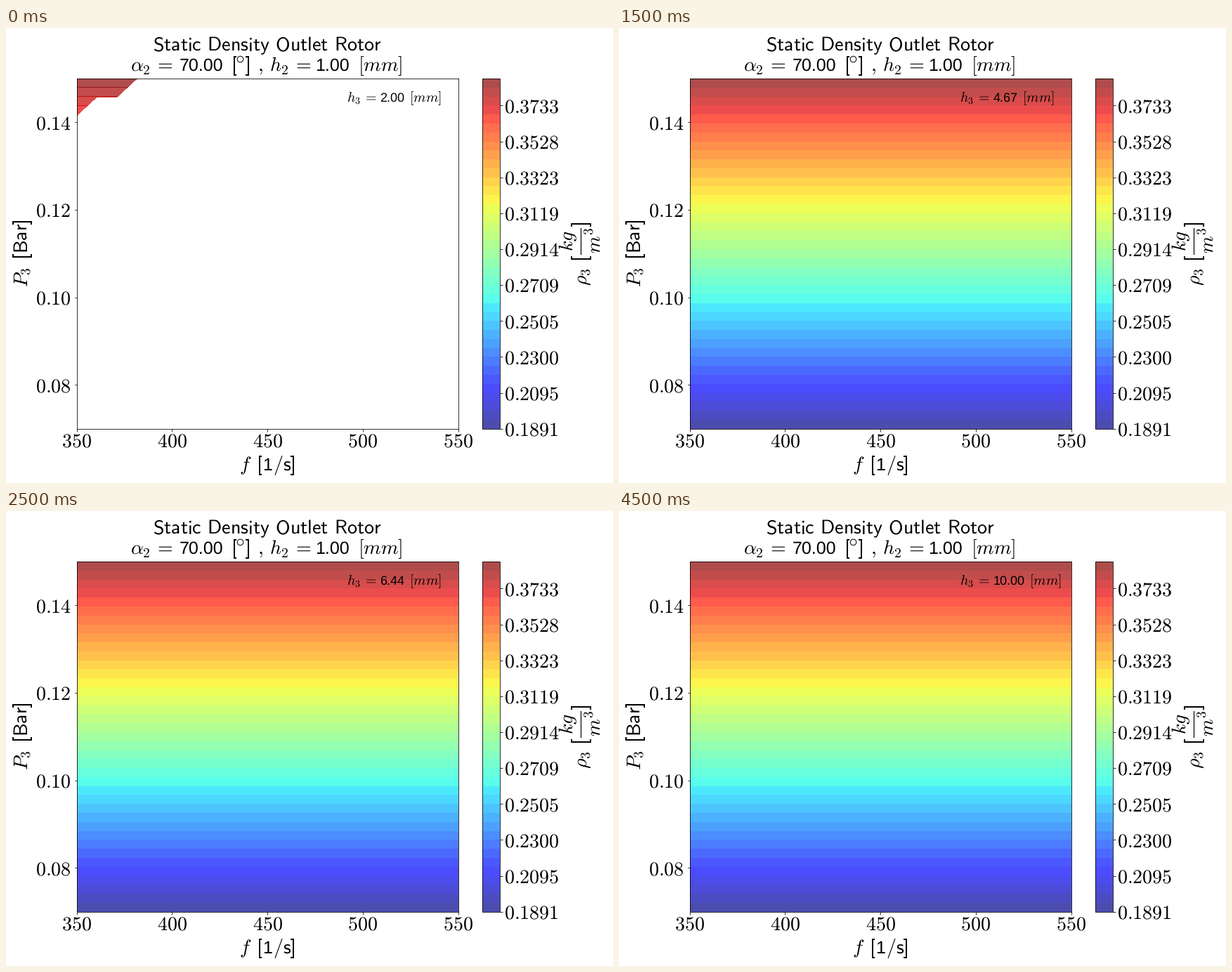
A matplotlib script for the animation above (5000 ms loop, 864 px wide and 648 px high).

```python
import numpy as np
import matplotlib.pyplot as plt
from matplotlib.animation import FuncAnimation
from matplotlib.lines import Line2D

W, H, DPI = 864, 648, 72
FRAMES, LOOP_MS = 10, 5000
N = 20
LOW, STEP = 0.18906, 0.0051167
BIG, SMALL = 28, 20

plt.rcParams.update({
    "mathtext.fontset": "cm",
    "text.hinting": "none",
    "text.hinting_factor": 1,
    "font.size": BIG,
    "axes.linewidth": 0.8,
})

fig = plt.figure(figsize=(W / DPI, H / DPI), dpi=DPI, facecolor="white")


def add_axes(left, top, right, bottom):
    return fig.add_axes([left / W, 1 - bottom / H,
                         (right - left) / W, (bottom - top) / H])


def label(x, y, tex, size=BIG, rotation=0, ha="left"):
    """Math text with its baseline starting at pixel (x, y)."""
    return fig.text(x / W, 1 - y / H, f"${tex}$", fontsize=size, ha=ha,
                    va="baseline", rotation=rotation, rotation_mode="anchor")


def number(x, y, text, size=BIG):
    """Sans-serif digits, half an em wide each."""
    return fig.text(x / W, 1 - y / H, text, fontsize=0.9 * size,
                    family="Liberation Sans", va="baseline")


def sans(words):
    return r"\hspace{0.38}".join(rf"\mathsf{{{w}}}" for w in words.split())


def line(px, py, lw, **style):
    fig.add_artist(Line2D(np.array(px) / W, 1 - np.array(py) / H,
                          color="black", lw=lw, **style))


def bracket(x, y, side, upright=True):
    """Sans-serif square bracket, set like a glyph at pixel (x, y)."""
    u = np.array([0.255, 0.127, 0.127, 0.255])
    if side == "]":
        u = 0.289 - u
    u = u * BIG
    v = np.array([0.722, 0.722, -0.222, -0.222]) * BIG
    px, py = (x + u, y - v) if upright else (x - v, y - u)
    line(px, py, 2, solid_capstyle="butt", solid_joinstyle="miter")


EQ = r"\hspace{0.18}="

# Density field, blanked below the deepest valid row of each column
f = np.linspace(350, 550, N)
p = np.linspace(0.07, 0.15, N)
levels = LOW + STEP * np.arange(40)
density = np.repeat(np.linspace(levels[0], levels[-1], N)[:, None], N, axis=1)

DEPTHS = [
    [2, 1, 1, 0] + [-1] * 16,
    [15, 14, 14, 13, 13, 13, 12, 12, 11, 11, 10, 10, 9, 8, 8, 7, 6, 5, 4, 2],
    [19] * 8 + [18] * 3 + [17] * 3 + [16] * 3 + [15, 15, 14],
    [19] * 20,
]

TOP, BOTTOM = 72, 570.7
ax = add_axes(100.6, TOP, 643.7, BOTTOM)
row = np.arange(N)[::-1, None]
fills = [
    ax.contourf(f, p, np.ma.masked_where(row > np.array(depth), density),
                levels=levels, cmap="jet", alpha=0.7)
    for depth in DEPTHS
]
ax.set(xlim=(350, 550), ylim=(0.07, 0.15))
ax.set_xticks(range(350, 551, 50))
ax.set_yticks([0.08, 0.10, 0.12, 0.14])
ax.xaxis.set_major_formatter(lambda v, _: f"${v:.0f}$")
ax.yaxis.set_major_formatter(lambda v, _: f"${v:.2f}$")
ax.tick_params(axis="x", pad=2)
ax.tick_params(axis="y", pad=4.5)

cax = add_axes(677.7, TOP, 702.6, BOTTOM)
bar = fig.colorbar(fills[-1], cax=cax, ticks=levels[::4])
bar.ax.yaxis.set_major_formatter(lambda v, _: f"${v:.4f}$")
bar.ax.tick_params(pad=2.5)

# Title
label(372, 32, sans("Static Density Outlet Rotor"), ha="center")
label(177, 61, rf"\alpha_2{EQ}")
number(246.5, 61, "70.00")
bracket(321, 61, "[")
line([332.5], [43.5], 0, marker="o", markersize=8.6,
     markerfacecolor="none", markeredgewidth=1)
bracket(340.3, 61, "]")
label(357.7, 61, r"\mathsf{,}")
label(374.8, 61, rf"h_2{EQ}")
number(440.5, 61, "1.00")
label(501.5, 61, "[mm]")

# Axis labels
label(331.5, 630, "f")
bracket(357, 630, "[")
number(365.5, 630, "1")
label(379.5, 630, r"/\mathsf{s}")
bracket(404, 630, "]")

label(31, 369, "P_3", rotation=90)
bracket(30, 329.5, "[", upright=False)
label(30.5, 321, r"\mathsf{Bar}", rotation=90)
bracket(30, 281, "]", upright=False)

label(827, 367, r"\rho_3", rotation=90)
bracket(825.5, 332.5, "[", upright=False)
label(807, 318, "kg", rotation=90)
label(847, 321, "m^3", rotation=90)
line([818, 818], [322, 285], 1.2)
bracket(825.5, 284, "]", upright=False)

# Running height
label(485, 105, rf"h_3{EQ}", size=SMALL)
value = number(532.5, 105, "", size=SMALL)
unit = label(574, 105, "[mm]", size=SMALL)
heights = np.linspace(2, 10, FRAMES)


def update(i):
    shown = min(i, len(fills) - 1)
    for k, fill in enumerate(fills):
        fill.set_visible(k == shown)
    text = f"{heights[i]:.2f}"
    value.set_text(text)
    unit.set_x((574 + SMALL / 2 * (len(text) - 4)) / W)
    return [*fills, value, unit]


anim = FuncAnimation(fig, update, frames=FRAMES, interval=LOOP_MS / FRAMES,
                     init_func=lambda: update(0), repeat=True, repeat_delay=0)
plt.show()
```
